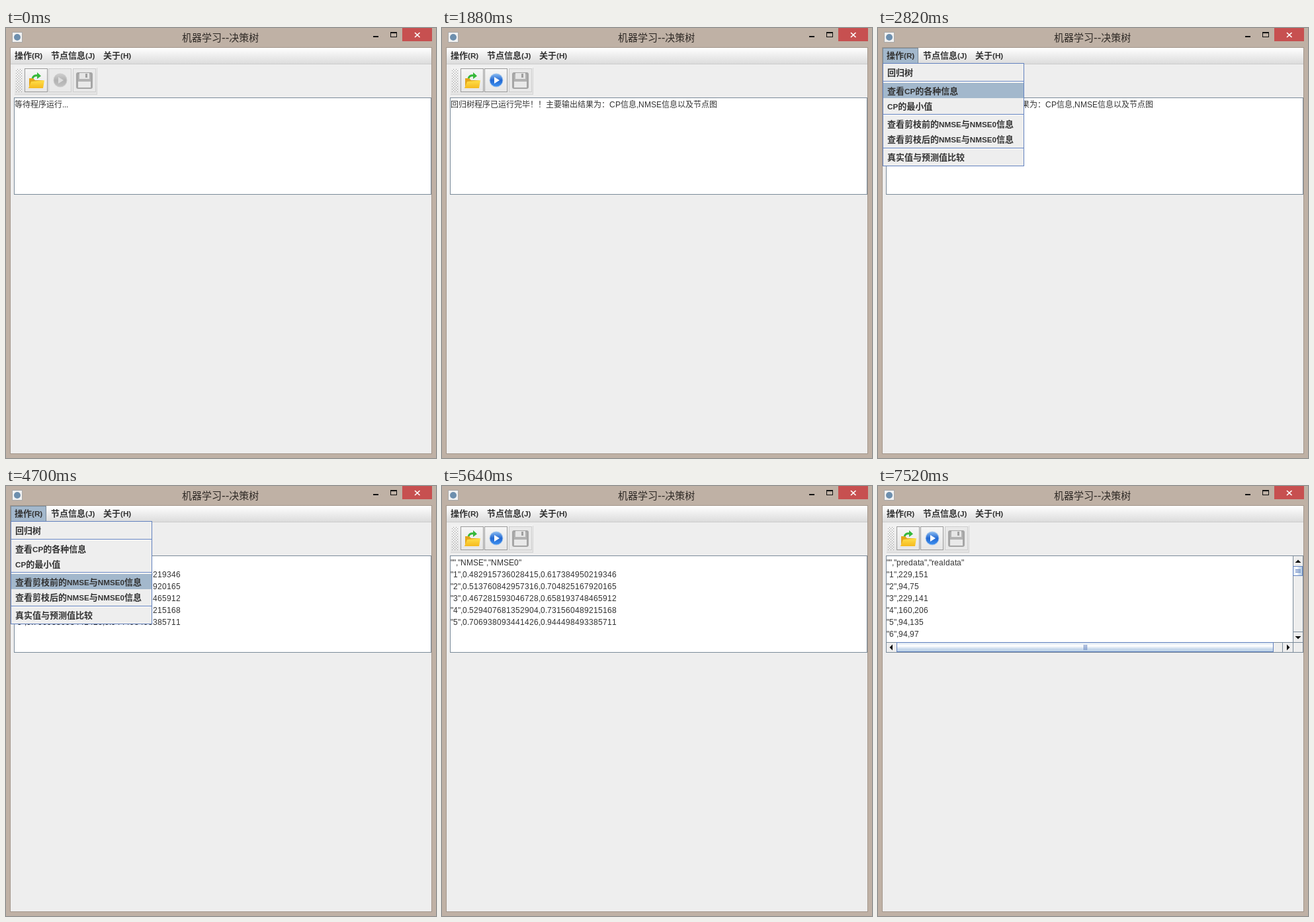
These frames come from a looping animation (650x650 px, 8 s). An HTML page with a canvas:

```html
<!DOCTYPE html>
<html lang="zh-CN">
<head>
<meta charset="utf-8">
<title>决策树</title>
<style>
html, body { margin: 0; width: 100%; height: 100%; overflow: hidden; background: #bfb1a5; }
canvas { display: block; width: 650px; height: 650px; }
</style>
</head>
<body>
<canvas id="stage" width="650" height="650"></canvas>
<script>
const ctx = document.getElementById('stage').getContext('2d');
const LOOP = 8000, STEP = 940;
const BLUE = '#6382bf', EDGE = '#7a8a99', SELECT = '#a3b8cc', PANEL = '#eeeeee', INK = '#333333';
const LATIN = '"Liberation Sans", Arial, sans-serif';
const CJK = '"Noto Sans CJK SC", "Noto Sans CJK", sans-serif';

const PLAIN = { cjk: 12, latin: 12, weight: 'normal', snap: true };
const BOLD = { cjk: 13, latin: 11.7, weight: 'bold', snap: false };
const TITLE = { cjk: 15, latin: 17, weight: 'normal', snap: false };

const MENU_ITEMS = [
  ['回归树', 55], ['查看CP的各种信息', 83], ['CP的最小值', 106],
  ['查看剪枝前的NMSE与NMSE0信息', 133], ['查看剪枝后的NMSE与NMSE0信息', 156],
  ['真实值与预测值比较', 183]
];
const SEPARATORS = [80, 130, 181];

const WAITING = ['等待程序运行...'];
const DONE = ['回归树程序已运行完毕！！主要输出结果为：CP信息,NMSE信息以及节点图'];
const CP_TABLE = [
  '"","CP","nsplit","rel error","xerror","xstd"',
  '"1",0.300060028418223,0,1,1.00484504315753,0.0572792372970663',
  '"2",0.105157311490636,1,0.699939971581777,0.764261903238594,0.0515618465360846',
  '"3",0.0530104559715564,2,0.594782660091141,0.705154973306434,0.0509274076324648',
  '"4",0.0372475622746297,3,0.541772204119585,0.66750118157047,0.0501623566556608',
  '"5",0.0328564166935451,4,0.504524641844955,0.670922273185176,0.0499889028669209',
  '"6",0.0156869360469327,5,0.47166822515141,0.672692316032549,0.0501158841244858'
];
const NMSE_TABLE = [
  '"","NMSE","NMSE0"',
  '"1",0.482915736028415,0.617384950219346',
  '"2",0.513760842957316,0.704825167920165',
  '"3",0.467281593046728,0.658193748465912',
  '"4",0.529407681352904,0.731560489215168',
  '"5",0.706938093441426,0.944498493385711'
];
const COMPARE_TABLE = ['"","predata","realdata"', '"1",229,151', '"2",94,75',
  '"3",229,141', '"4",160,206', '"5",94,135', '"6",94,97'];

// Each scene lasts STEP ms; "pick" is the highlighted menu item, "thumb" the scroll handle height.
const SCENES = [
  { lines: WAITING, idle: true },
  { lines: WAITING, idle: true, pick: 0 },
  { lines: DONE },
  { lines: DONE, pick: 1 },
  { lines: CP_TABLE, thumb: 38 },
  { lines: NMSE_TABLE, pick: 3 },
  { lines: NMSE_TABLE },
  { lines: NMSE_TABLE, pick: 5 },
  { lines: COMPARE_TABLE, thumb: 14 }
];

function rect(x, y, w, h, fill) {
  ctx.fillStyle = fill;
  ctx.fillRect(x, y, w, h);
}

function frame(x, y, w, h, color) {
  ctx.strokeStyle = color;
  ctx.lineWidth = 1;
  ctx.strokeRect(x + .5, y + .5, w - 1, h - 1);
}

function shape(points, fill) {
  ctx.beginPath();
  points.forEach(([x, y]) => ctx.lineTo(x, y));
  ctx.closePath();
  ctx.fillStyle = fill;
  ctx.fill();
}

function disc(x, y, r, fill) {
  ctx.beginPath();
  ctx.arc(x, y, r, 0, Math.PI * 2);
  ctx.fillStyle = fill;
  ctx.fill();
}

function gradient(x0, y0, x1, y1, ...colors) {
  const g = ctx.createLinearGradient(x0, y0, x1, y1);
  colors.forEach((c, i) => g.addColorStop(i / (colors.length - 1), c));
  return g;
}

// Draws mixed scripts; "snap" rounds each glyph advance to whole pixels.
function text(str, x, y, style, color = INK) {
  ctx.fillStyle = color;
  for (const ch of str) {
    const wide = ch > '\u2fff';
    ctx.font = `${style.weight} ${wide ? style.cjk : style.latin}px ${wide ? CJK : LATIN}`;
    ctx.fillText(ch, x, y);
    const advance = ctx.measureText(ch).width;
    x += style.snap ? Math.round(advance) : advance;
  }
}

function drawWindow() {
  rect(0, 0, 650, 650, '#bfb1a5');
  rect(6, 29, 638, 615, '#a3978c');
  rect(7, 30, 636, 613, PANEL);

  rect(9, 6, 16, 16, '#f2f2f2');
  frame(9, 6, 16, 16, '#a9a9a9');
  disc(17, 14, 5, '#6d8fae');
  text('机器学习--决策树', 266, 20, TITLE, '#2e2925');

  rect(555, 12, 8, 2, '#111');
  frame(581, 6, 10, 8, '#111');
  rect(581, 6, 10, 2, '#111');
  rect(599, 0, 45, 20, '#c75050');
  ctx.strokeStyle = '#fff';
  ctx.lineWidth = 1.7;
  ctx.beginPath();
  ctx.moveTo(618, 7); ctx.lineTo(625.5, 14);
  ctx.moveTo(625.5, 7); ctx.lineTo(618, 14);
  ctx.stroke();
}

function drawMenuBar(open) {
  rect(7, 30, 636, 24, gradient(0, 30, 0, 54, '#ffffff', '#dcdcdc'));
  rect(7, 54, 636, 1, '#cccccc');
  if (open) {
    rect(7, 30, 54, 24, SELECT);
    frame(7, 30, 54, 24, EDGE);
  }
  text('操作(R)', 13, 46, BOLD);
  text('节点信息(J)', 68, 46, BOLD);
  text('关于(H)', 147, 46, BOLD);
}

function drawButton(x, enabled) {
  rect(x, 61, 35, 36, enabled ? gradient(0, 61, 0, 97, '#f6f6f6', '#e6e6e6') : '#e9e9e9');
  frame(x, 61, 35, 36, enabled ? '#9a9a9a' : '#cdcdcd');
}

function drawFolder() {
  shape([[35, 76], [41, 76], [44, 79], [56, 79], [56, 91], [35, 91]], '#e3a51a');
  shape([[38, 81], [58, 79], [56, 91], [34, 91]], gradient(0, 79, 0, 91, '#ffe04a', '#f5b91f'));
  ctx.strokeStyle = '#35b83a';
  ctx.lineWidth = 3;
  ctx.beginPath();
  ctx.moveTo(40, 76);
  ctx.quadraticCurveTo(42, 71, 48, 72);
  ctx.stroke();
  shape([[47, 67], [53, 72.5], [47, 77]], '#35b83a');
}

function drawPlay(enabled) {
  disc(82, 79, 10.5, enabled ? '#a9c8ec' : '#cccccc');
  disc(82, 79, 9.5, enabled ? gradient(0, 69, 0, 89, '#8abcf2', '#2268d2', '#3f92f0')
                            : gradient(0, 69, 0, 89, '#cfcfcf', '#b2b2b2', '#c2c2c2'));
  shape([[79, 74], [87, 79], [79, 84]], enabled ? '#ffffff' : '#dddddd');
}

function drawFloppy() {
  ctx.beginPath();
  ctx.roundRect(106, 67, 25, 25, 3);
  ctx.fillStyle = '#a5a5a5';
  ctx.fill();
  rect(109, 70, 19, 19, '#b3b3b3');
  rect(111, 68, 15, 9, '#e6e6e6');
  rect(120, 69, 3, 6, '#a0a0a0');
  rect(109, 81, 19, 9, '#e9e9e9');
}

function drawToolbar(ready) {
  rect(13, 58, 125, 43, gradient(0, 58, 0, 101, '#f2f2f2', '#e4e4e4'));
  rect(137, 60, 1, 41, '#d4d4d4');
  rect(13, 100, 125, 1, '#d4d4d4');
  for (let y = 62; y < 98; y += 2)
    for (let x = 15 + y / 2 % 2 * 2; x < 25; x += 4) rect(x, y, 1, 1, '#999');
  drawButton(28, true);
  drawButton(64, ready);
  drawButton(101, false);
  drawFolder();
  drawPlay(ready);
  drawFloppy();
}

function drawArrow(cx, cy, dx, dy) {
  shape([[cx + dx * 2.5, cy + dy * 2.5],
         [cx - dx * 2 + dy * 4.5, cy - dy * 2 + dx * 4.5],
         [cx - dx * 2 - dy * 4.5, cy - dy * 2 - dx * 4.5]], '#111');
}

function drawScrollbars(thumb) {
  rect(627, 106, 15, 145, PANEL);
  rect(13, 236, 629, 15, PANEL);
  rect(627, 106, 1, 145, EDGE);
  rect(13, 236, 629, 1, EDGE);
  for (const y of [121, 220]) rect(628, y, 14, 1, EDGE);
  for (const x of [28, 611]) rect(x, 237, 1, 14, EDGE);

  const shine = ['#dde8f3', '#ffffff', '#c8d9ec', '#b8cfe5'];
  rect(628, 122, 14, thumb, gradient(628, 0, 642, 0, ...shine));
  frame(627, 121, 15, thumb + 1, BLUE);
  rect(28, 237, 570, 14, gradient(0, 237, 0, 251, ...shine));
  frame(28, 236, 570, 15, BLUE);
  const mid = 122 + Math.floor(thumb / 2);
  for (const d of [-2, 0, 2]) {
    rect(631, mid + d - 1, 8, 1, BLUE);
    rect(313 + d, 240, 1, 8, BLUE);
  }
  drawArrow(635, 114, 0, -1);
  drawArrow(635, 229, 0, 1);
  drawArrow(20, 244, -1, 0);
  drawArrow(620, 244, 1, 0);
}

function drawOutput({ lines, thumb }) {
  rect(12, 105, 631, 147, '#ffffff');
  lines.forEach((line, i) => text(line, 13, 120 + i * 18, PLAIN));
  if (thumb) drawScrollbars(thumb);
  frame(12, 105, 631, 147, EDGE);
}

function drawMenu(pick) {
  rect(7, 53, 214, 156, PANEL);
  rect(8, MENU_ITEMS[pick][1], 212, 23, SELECT);
  for (const y of SEPARATORS) {
    rect(8, y, 212, 1, BLUE);
    rect(8, y + 1, 212, 1, '#ffffff');
  }
  MENU_ITEMS.forEach(([label, top]) => text(label, 14, top + 17, BOLD));
  frame(7, 53, 214, 156, BLUE);
}

function draw(time) {
  const scene = SCENES[Math.floor(time % LOOP / STEP)];
  const open = scene.pick !== undefined;
  drawWindow();
  drawMenuBar(open);
  drawToolbar(!scene.idle);
  drawOutput(scene);
  if (open) drawMenu(scene.pick);
}

const start = performance.now();
function tick() {
  draw(performance.now() - start);
  requestAnimationFrame(tick);
}
tick();
</script>
</body>
</html>
```
